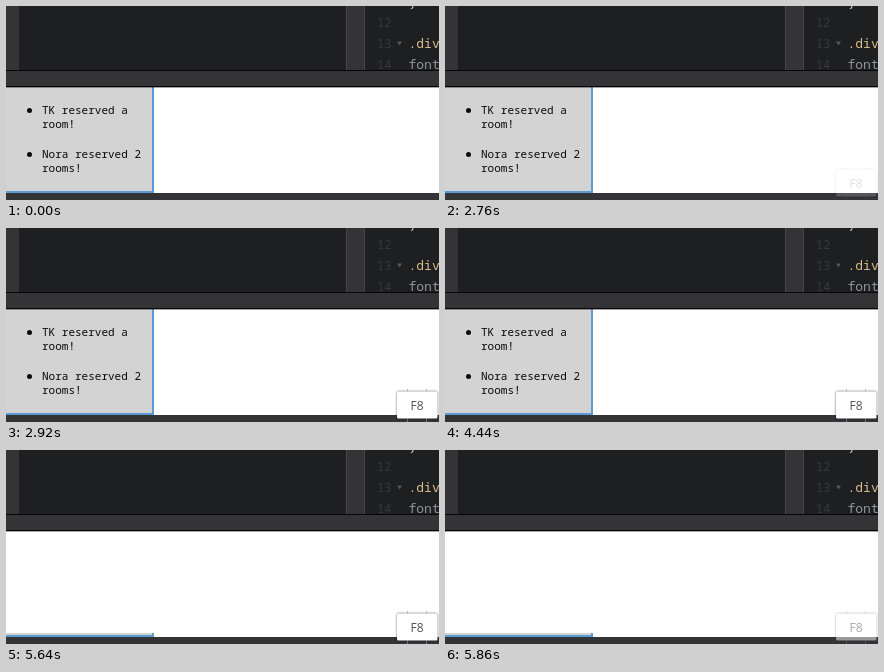
Animation, 433 px wide and 194 px high, one loop 5.91 s. Source, as an HTML page:

```html
<!DOCTYPE html>
<html lang="en">
<head>
<meta charset="utf-8">
<title>Reservations</title>
<style>
  html, body { margin: 0; width: 100%; height: 100%; overflow: hidden; background: #fff; }
  svg { display: block; width: 433px; height: 194px; }
  text { white-space: pre; }
  .code { font: 13px "Noto Sans Mono", monospace; }
  .num { font-size: 12px; fill: #36383a; }
  .list { font: 11px "Noto Sans Mono", monospace; fill: #0a0a0a; }
  .cap { filter: drop-shadow(0 0 1.2px rgba(0, 0, 0, .65)); }
  .label { font: 12px "Open Sans", sans-serif; fill: #505050; }
</style>
</head>
<body>
<svg viewBox="0 0 433 194">
  <!-- editor panes -->
  <rect width="433" height="81" fill="#343436"/>
  <g fill="#1d1f20">
    <rect x="13" width="327" height="64"/>
    <rect x="359" width="74" height="64"/>
  </g>
  <path d="M340.5 0V64M358.5 0V64" stroke="#464648"/>
  <g class="code">
    <g class="num">
      <text x="371" y="21">12</text>
      <text x="371" y="42">13</text>
      <text x="371" y="63">14</text>
    </g>
    <path d="M391 35.5h5l-2.5 4z" fill="#55575a"/>
    <text x="403" y="1" fill="#ccc">}</text>
    <text x="402.5" y="42" fill="#dcbc8c">.div</text>
    <text x="402.5" y="63" fill="#94939b">font</text>
  </g>
  <rect y="64" width="433" height="17" fill="#343436"/>
  <path d="M0 64.5H433M0 80.5H433" stroke="#060606"/>

  <!-- preview -->
  <rect y="81" width="433" height="106" fill="#fff"/>
  <rect y="81" width="148" height="106" fill="#d3d3d3"/>
  <path d="M147 81V186H0" fill="none" stroke="#5c9cd4" stroke-width="2"/>
  <g class="list">
    <circle cx="23.5" cy="104.5" r="2.5"/>
    <text x="36" y="108">TK reserved a</text>
    <text x="36" y="122">room!</text>
    <circle cx="23.5" cy="148.5" r="2.5"/>
    <text x="36" y="152">Nora reserved 2</text>
    <text x="36" y="166">rooms!</text>
  </g>
  <rect id="cover" y="81" width="148" height="102" fill="#fff"/>
  <path d="M0 81.5H433" stroke="#000" stroke-opacity=".35"/>
  <rect y="187" width="433" height="7" fill="#343436"/>

  <!-- pressed key -->
  <g id="key">
    <path d="M401.5 160.5v3M420.5 160.5v3" stroke="#ccc"/>
    <path d="M401.5 190v4M420.5 190v4" stroke="#777"/>
    <rect class="cap" x="391" y="163.5" width="40.5" height="27" rx="1.5" fill="#fff"/>
    <text class="label" x="411" y="182" text-anchor="middle">F8</text>
  </g>
</svg>
<script>
  const LOOP = 5910, CLEARED = 5450;
  // start time, key opacity
  const fades = [[0, 0], [2760, .17], [2840, .63], [2920, 1], [5760, .8], [5860, .5]];
  const key = document.getElementById("key");
  const cover = document.getElementById("cover");

  function draw(now) {
    const t = now % LOOP;
    key.setAttribute("opacity", fades.findLast(([start]) => t >= start)[1]);
    cover.setAttribute("visibility", t >= CLEARED ? "visible" : "hidden");
    requestAnimationFrame(draw);
  }
  draw(performance.now());
</script>
</body>
</html>
```
